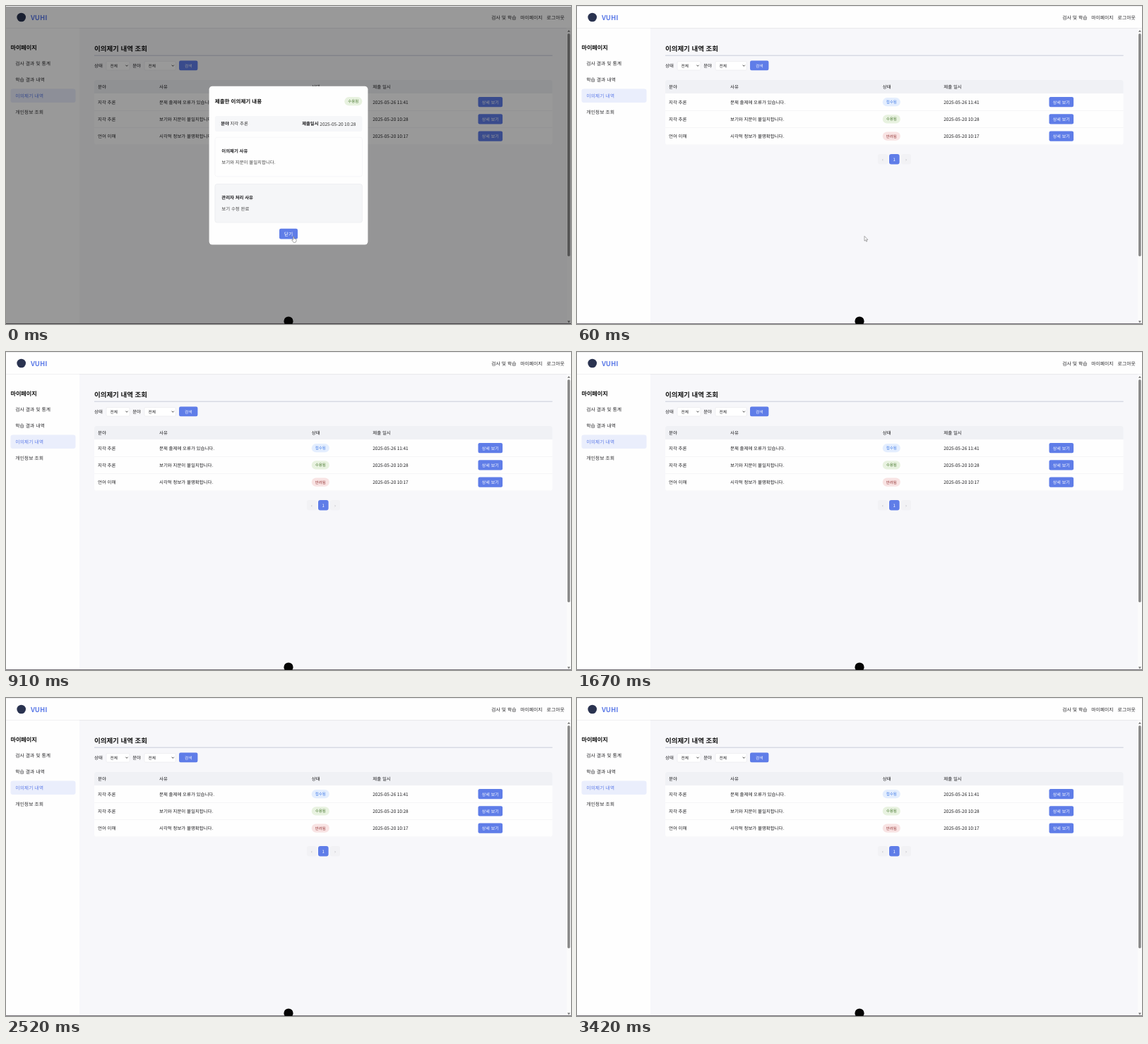
An HTML page with a canvas that plays this animation: 800x451 px, repeating every 3450 ms.

```html
<!DOCTYPE html>
<html lang="ko">
<head>
<meta charset="utf-8">
<title>이의제기 내역 조회</title>
<style>
html, body { margin: 0; width: 100%; height: 100%; overflow: hidden; background: #f7f7fa; }
canvas { display: block; width: 800px; height: 451px; }
</style>
</head>
<body>
<canvas id="stage"></canvas>
<script>
const LOOP = 3450, CLOSE_AT = 60, CURSOR_HIDE = 580;
const UNIT = 1 / 2.4; // page pixels to stage pixels
const FONT = '"Noto Sans CJK KR", "Noto Sans KR", "Noto Sans CJK", sans-serif';
const BLUE = '#5f7de8', INK = '#1c1c1f';

const canvas = document.getElementById('stage');
const ctx = canvas.getContext('2d');
const dpr = window.devicePixelRatio || 1;
canvas.width = Math.round(800 * dpr);
canvas.height = Math.round(451 * dpr);
ctx.textRendering = 'geometricPrecision';

function rect(x, y, w, h, fill) {
  ctx.fillStyle = fill;
  ctx.fillRect(x, y, w, h);
}

function box(x, y, w, h, r, fill, stroke) {
  ctx.beginPath();
  ctx.roundRect(x, y, w, h, r);
  ctx.fillStyle = fill;
  ctx.fill();
  if (stroke) {
    ctx.strokeStyle = stroke;
    ctx.lineWidth = 0.5;
    ctx.stroke();
  }
}

function disc(x, y, r, fill) {
  ctx.beginPath();
  ctx.arc(x, y, r, 0, Math.PI * 2);
  ctx.fillStyle = fill;
  ctx.fill();
}

function poly(points, fill) {
  ctx.beginPath();
  points.forEach(([x, y]) => ctx.lineTo(x, y));
  ctx.closePath();
  ctx.fillStyle = fill;
  ctx.fill();
}

// y is the vertical centre of the line
function text(str, x, y, size, color = INK, weight = 400, align = 'left') {
  ctx.save();
  ctx.translate(x, y);
  ctx.scale(UNIT, UNIT);
  ctx.font = `${weight} ${size}px ${FONT}`;
  ctx.textAlign = align;
  ctx.fillStyle = color;
  ctx.fillText(str, 0, size * 0.37);
  ctx.restore();
}

function button(label, x, y, w, h, size) {
  box(x, y, w, h, 2.2, BLUE);
  text(label, x + w / 2, y + h / 2 + 0.1, size, '#fff', 400, 'center');
}

const STATUS = {
  접수됨: ['#e4eefe', '#3f7ae6'],
  수용됨: ['#e8f2e0', '#4b7a33'],
  반려됨: ['#f8e3e3', '#963838']
};

function badge(label, x, y) {
  const [bg, fg] = STATUS[label];
  box(x, y - 6.1, 25, 12.2, 6.1, bg);
  text(label, x + 12.5, y, 13.2, fg, 400, 'center');
}

function select(x, w) {
  box(x, 78.5, w, 12.5, 1.8, '#fff', '#e2e2e6');
  text('전체', x + 5.6, 84.5, 13.5);
  const cx = x + w - 4;
  ctx.beginPath();
  ctx.moveTo(cx - 1.6, 83.7);
  ctx.lineTo(cx, 85.4);
  ctx.lineTo(cx + 1.6, 83.7);
  ctx.strokeStyle = '#222';
  ctx.lineWidth = 0.8;
  ctx.stroke();
}

function drawHeader() {
  rect(0, 0, 800, 31, '#fefefe');
  rect(0, 0, 800, 1, '#ededee');
  rect(0, 31, 800, 0.7, '#e4e4e7');
  disc(21.7, 16, 6.3, '#2a3350');
  text('VUHI', 35, 16.6, 23, BLUE, 700);
  text('검사 및 학습', 687.3, 16.3, 16.4, '#2c2c2f');
  text('마이페이지', 728.2, 16.3, 16.4, '#2c2c2f');
  text('로그아웃', 765.6, 16.3, 16.4, '#2c2c2f');
}

function drawSidebar() {
  rect(0, 31.7, 104, 419, '#fefefe');
  text('마이페이지', 6.4, 59, 19.5, '#111', 700);
  box(6.5, 117.5, 92, 19.5, 3, '#eaeefc');
  ['검사 결과 및 통계', '학습 결과 내역', '이의제기 내역', '개인정보 조회'].forEach((s, i) =>
    text(s, 13.3, 81.4 + i * 23.05, 16.4, i === 2 ? BLUE : '#2c2c2f'));
}

function drawTable() {
  const cols = [130, 217, 432.8, 519.3];
  box(125, 105, 648.7, 91.5, 3, '#fefefe');
  box(125, 105, 648.7, 19, [3, 3, 0, 0], '#f0f1f5');
  ['분야', '사유', '상태', '제출 일시'].forEach((s, i) => text(s, cols[i], 114.3, 15.4, INK, 500));
  const rows = [
    ['지각 추론', '문제 출제에 오류가 있습니다.', '접수됨', '2025-05-26 11:41'],
    ['지각 추론', '보기와 지문이 불일치합니다.', '수용됨', '2025-05-20 10:28'],
    ['언어 이해', '시각적 정보가 불명확합니다.', '반려됨', '2025-05-20 10:17']
  ];
  rows.forEach(([field, reason, status, date], i) => {
    const y = 136.2 + i * 24.2;
    if (i) rect(125, y - 12.2, 648.7, 0.6, '#f0f0f3');
    text(field, cols[0], y, 15.4);
    text(reason, cols[1], y, 15.4);
    badge(status, cols[2], y);
    text(date, cols[3], y, 15.4);
    button('상세 보기', 668.5, y - 7.1, 34.6, 14.2, 14.6);
  });
}

function drawPager() {
  box(426, 210, 14, 14.5, 3, '#f2f2f5');
  box(459, 210, 14, 14.5, 3, '#f2f2f5');
  text('‹', 433, 217.3, 15, '#a5a5aa', 400, 'center');
  text('›', 466, 217.3, 15, '#a5a5aa', 400, 'center');
  box(442, 210, 14.6, 14.6, 3, BLUE);
  text('1', 449.3, 217.3, 14.5, '#fff', 500, 'center');
}

function drawScrollbar() {
  rect(793.8, 31.7, 6.2, 419, '#fbfbfb');
  box(795, 39, 3.7, 316, 1.8, '#8b8b8b');
  poly([[794.9, 36.8], [796.9, 34], [798.9, 36.8]], '#777');
  poly([[794.9, 446.6], [796.9, 449.4], [798.9, 446.6]], '#777');
}

function drawPage() {
  rect(0, 0, 800, 451, '#f7f7fa');
  drawHeader();
  drawSidebar();
  text('이의제기 내역 조회', 125, 60.2, 22.7, '#111', 700);
  rect(125, 69.7, 648.7, 0.9, '#c3c8d6');
  text('상태', 125, 84.5, 15.4);
  select(142, 33);
  text('분야', 179.2, 84.5, 15.4);
  select(196, 44.3);
  button('검색', 245, 77.6, 26.4, 13.6, 13.4);
  drawTable();
  drawPager();
  drawScrollbar();
  rect(0, 450, 800, 1, '#77737a');
}

function drawModal() {
  rect(0, 1, 800, 450, 'rgba(0,0,0,.4)');
  box(287.6, 113.8, 224.8, 224.8, 4.5, '#fefefe');
  text('제출한 이의제기 내용', 295.8, 135.1, 18, '#111', 700);
  badge('수용됨', 479.3, 135.2);

  box(295.8, 156, 208.6, 22, 3, '#f6f7f9');
  text('분야', 304.2, 167.1, 15.2, INK, 600);
  text('지각 추론', 317.4, 167.1, 15.4, '#333');
  text('제출일시', 419.2, 167.1, 15.2, INK, 600);
  text('2025-05-20 10:28', 444.3, 167.1, 15.6, '#333');

  box(295.9, 186.3, 208.5, 55.5, 3, '#fefefe', '#eeeff2');
  text('이의제기 사유', 305.3, 205.4, 15.3, INK, 700);
  text('보기와 지문이 불일치합니다.', 305.3, 221.5, 15.4, '#444');

  box(295.9, 252.6, 208.5, 54.5, 3, '#f5f6f8', '#e2e4e8');
  text('관리자 처리 사유', 305.3, 271.8, 15.3, INK, 700);
  text('보기 수정 완료', 305.3, 287.6, 15.4, '#444');
  button('닫기', 387, 315.8, 26, 14.7, 16.3);
}

function drawPointer(shape) {
  const path = new Path2D(shape);
  ctx.fillStyle = '#fff';
  ctx.strokeStyle = '#555';
  ctx.lineWidth = 0.5;
  ctx.lineJoin = 'round';
  ctx.fill(path);
  ctx.stroke(path);
}

const ARROW = 'M407 326.4V333.2L408.6 331.8L409.7 334.2L410.8 333.7L409.8 331.4H411.8Z';
const HAND = 'M406.4 327.2Q407.1 326.3 407.8 327.2V329.8Q410.8 329.9 411 331.2' +
  'V333.2Q410.7 335.6 408.6 335.6Q406.8 335.6 406 333.8L404.6 331.9Q405 330.9 406.4 332Z';

function frame(now) {
  const t = now % LOOP;
  const open = t < CLOSE_AT;
  ctx.setTransform(dpr, 0, 0, dpr, 0, 0);
  drawPage();
  if (open) drawModal();
  disc(400, 447, 6.6, '#050505');
  if (t < CURSOR_HIDE) drawPointer(open ? HAND : ARROW);
}

let start;
function tick(now) {
  start ??= now;
  frame(now - start);
  requestAnimationFrame(tick);
}
frame(0);
requestAnimationFrame(tick);
</script>
</body>
</html>
```
